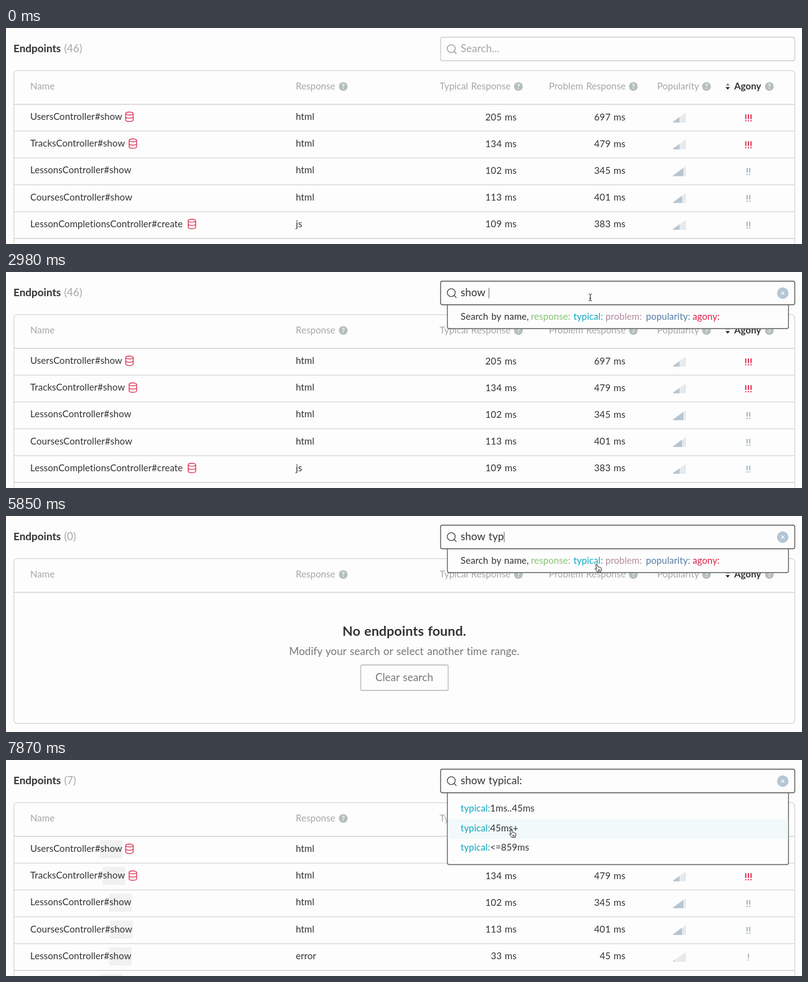
Recreate the animation shown at these times as an HTML page. Size 1280x348 px, loop 8000 ms.

```html
<!DOCTYPE html>
<html lang="en">
<head>
<meta charset="utf-8">
<title>Endpoint search</title>
<style>
  html, body { margin: 0; width: 100%; height: 100%; overflow: hidden; background: #fdfdfd; }
  svg { display: block; width: 1280px; height: 348px; font: 15px Lato, "Open Sans", sans-serif; letter-spacing: .06px; word-spacing: 1px; --edge: #d0d0d0; --lens: #9a9a9a; }
  svg.opening { --edge: #a3a3a3; --lens: #7c7c7c; }
  svg.open { --edge: #5c5c5c; --lens: #4a4a4a; }
  text { fill: #333; white-space: pre; }
  .big { font-size: 17px; }
  .bold { font-weight: 700; }
  .soft { fill: #a6a6a6; }
  .mid { fill: #777; }
  .end { text-anchor: end; }
  .center { text-anchor: middle; }
  .line { fill: none; stroke: #d5d5d5; stroke-width: 1.3; }
  .db { fill: none; stroke: #dc1f45; stroke-width: 1.2; }
  .help circle { fill: #b4bfbe; }
  .help text { fill: #fff; font: 700 11px Lato, sans-serif; text-anchor: middle; }
  .mark { fill: #f1f1f1; }
  .hover { fill: #f1f9fa; }
  .panel { fill: #fdfdfd; stroke: #666; stroke-width: 1.4; }
  .response { fill: #87c173; }
  .typical { fill: #0ea7bf; }
  .problem { fill: #b58a9f; }
  .popularity { fill: #557da5; }
  .agony { fill: #dc1f45; }
  #box { fill: #fdfdfd; stroke: var(--edge); stroke-width: 1.4; }
  #lens { fill: none; stroke: var(--lens); stroke-width: 1.3; stroke-linecap: round; }
  #caret { fill: #777; }
</style>
</head>
<body>
<svg id="stage" viewBox="0 0 1280 348">
  <text class="big bold" x="12" y="39">Endpoints</text>
  <text class="big soft" id="count" x="93.5" y="39"></text>
  <rect id="rowHover" class="hover" x="13" width="1255" height="43.2"/>
  <rect id="frame" class="line" x="12.7" y="68.7" width="1255.6" rx="5"/>
  <path class="line" d="M13 123H1268"/>
  <g id="head"></g>
  <g id="all"></g>
  <g id="found"></g>
  <g id="none">
    <text class="bold center" x="640.5" y="193" font-size="21.5">No endpoints found.</text>
    <text class="big mid center" x="640.5" y="224">Modify your search or select another time range.</text>
    <rect x="570.5" y="240" width="140.5" height="41" rx="2" fill="none" stroke="#b9b9b9" stroke-width="1.3"/>
    <text class="big mid center" x="640.5" y="266">Clear search</text>
  </g>
  <g id="hint"></g>
  <g id="names"></g>
  <g id="ranges"></g>
  <rect id="box" x="698.8" y="14.7" width="569.6" height="38" rx="3"/>
  <g id="lens"><circle cx="716" cy="33.2" r="6.4"/><path d="M720.6 37.8L724 41.2"/></g>
  <text class="big soft" id="prompt" x="731" y="39">Search...</text>
  <text class="big" id="query" x="731" y="39"></text>
  <rect id="caret" y="25.5" width="1.1" height="17"/>
  <g id="clear">
    <circle cx="1249" cy="34" r="9.2" fill="#b4c5d5"/>
    <path d="M1246.4 31.4l5.2 5.2m0-5.2l-5.2 5.2" stroke="#fff" stroke-width="1.2"/>
  </g>
  <g id="pointer" stroke="#222" stroke-linejoin="round" stroke-linecap="round">
    <path id="beam" d="M-2-5.5Q0-5.5 0-4.2Q0-5.5 2-5.5M0-4.2V4.2M-2 5.5Q0 5.5 0 4.2Q0 5.5 2 5.5M-1 1.5H1" fill="none"/>
    <path id="hand" d="M-3.4-5.4Q-2.2-6.8-1.2-5.2L.2-1.6Q1.4-2.6 2.2-1.3Q3.4-2 4.1-.7Q5.3-.9 5.4.6V3L4.6 4.6V6.2H-1.2L-1.7 4.8L-4.6 1.6Q-5.2.2-3.6.2L-1.9 1.2L-3.6-4Q-3.8-4.9-3.4-5.4ZM.6 2.2V4.4M2.6 2.2V4.4" fill="#fff"/>
  </g>
</svg>
<script>
const LOOP = 8000, ROW = 43.2, ITEM = 31.6, HOP = 118;
const $ = id => document.getElementById(id);
const label = (x, y, str, cls = '') => `<text x="${x}" y="${y}" class="${cls}">${str}</text>`;

// Table header
const help = x => `<g class="help"><circle cx="${x}" cy="94.3" r="7"/>${label(x, 98.2, '?')}</g>`;
$('head').innerHTML =
  label(39, 99, 'Name', 'soft') +
  label(466, 99, 'Response', 'soft') +
  label(811.5, 99, 'Typical Response', 'soft end') +
  label(996.5, 99, 'Problem Response', 'soft end') +
  label(1047, 99, 'Popularity', 'soft') +
  label(1171, 99, 'Agony', 'bold') +
  [542.3, 824, 1008.8, 1126.4, 1227.5].map(help).join('') +
  '<path d="M1157 92.8l3.5-4 3.5 4z" fill="#999"/><path d="M1157 95.3h7l-3.5 4z" fill="#222"/>';

// Table rows: name, format, typical, problem, popularity, agony, icon x
const top4 = [
  ['UsersController', 'html', 205, 697, 5, 3, 198.5],
  ['TracksController', 'html', 134, 479, 5, 3, 204],
  ['LessonsController', 'html', 102, 345, 8, 2],
  ['CoursesController', 'html', 113, 401, 7, 2]
];
const bars = level => Array.from({ length: 10 }, (_, i) => {
  const h = 2 + i * 1.5;
  return `<rect x="${1073 + i * 2.08}" y="${152.3 - h}" width="1.3" height="${h}" fill="${i < level ? '#8fa4b6' : '#dadfe2'}"/>`;
}).join('');
const bangs = n => {
  let d = '';
  for (let i = 0; i < n; i++) d += `M${1193.8 + (i - (n - 1) / 2) * 4.2} 139.3v7.4m0 1.8v2`;
  return `<path d="${d}" stroke="${n > 2 ? '#dc1f45' : n > 1 ? '#9db0c1' : '#a9b4be'}" stroke-width="1.8"/>`;
};
const disk = x => `<path class="db" transform="translate(${x} 143)" d="M-6-5.2A6 2.4 0 0 1 6-5.2A6 2.4 0 0 1-6-5.2V5.2A6 2.4 0 0 0 6 5.2V-5.2M-6 0A6 2.4 0 0 0 6 0"/>`;
const row = ([name, type, typical, problem, pop, agony, icon], i, action) =>
  `<g transform="translate(0 ${i * ROW})"><path class="line" d="M13 ${123 + ROW}H1268"/>` +
  label(39, 148, `${name}#${action}`, 'name') + label(466, 148, type) +
  label(821, 148.7, typical + ' ms', 'end') + label(996, 148.7, problem + ' ms', 'end') +
  bars(pop) + bangs(agony) + (icon ? disk(icon) : '') + '</g>';

$('all').innerHTML = top4.map((r, i) => row(r, i, 'show')).join('') +
  row(['LessonCompletionsController', 'js', 109, 383, 5, 2, 299], 4, 'create');
$('found').innerHTML = [...top4,
  ['LessonsController', 'error', 33, 45, 1, 1],
  ['UsersController', 'error', 31, 44, 1, 1]
].map((r, i) => row(r, i, 'show')).join('');

for (const t of $('found').querySelectorAll('.name')) {
  const from = t.textContent.indexOf('#') + 1;
  const x = t.getStartPositionOfChar(from).x, w = t.getSubStringLength(from, 4);
  t.insertAdjacentHTML('beforebegin', `<rect class="mark" x="${x - 0.5}" y="129" width="${w + 1}" height="29"/>`);
}

// Dropdowns
const panel = bottom => `<path class="panel" d="M709.7 50V${bottom - 3}q0 3 3 3H1255.3q3 0 3-3V50"/>`;
const word = (key, x) => label(x, 76.5, key + ':', key);
const list = items => items.map((s, i) => label(731, 83 + i * ITEM, s)).join('');
$('hint').innerHTML = panel(91.3) + label(731, 76.5, 'Search by name,') +
  word('response', 844) + word('typical', 912.5) + word('problem', 964) +
  word('popularity', 1029) + word('agony', 1104);
$('names').innerHTML = panel(232) +
  list(['', 'Users', 'Tracks', 'Courses', 'Lessons'].map(s => (s && s + 'Controller') + '#show'));
$('ranges').innerHTML = panel(168.5) +
  `<rect id="itemHover" class="hover" x="710.6" width="546.8" height="${ITEM}"/>` +
  list(['1ms..45ms', '45ms+', '&lt;=859ms'].map(s => `<tspan class="typical">typical:</tspan>${s}`));

// Each cue changes part of the state from its time on
const cues = [
  [0, { look: '', query: '', drop: '', view: 'all', caret: false }],
  [1330, { look: 'opening', drop: 'hint', caret: true }],
  [1440, { look: 'open' }],
  [1790, { caret: false }],
  [2270, { caret: true }],
  [2630, { query: 's' }],
  [2750, { query: 'sh' }],
  [2870, { query: 'show' }],
  [2980, { query: 'show ' }],
  [3340, { view: 'found', drop: 'names' }],
  [3460, { caret: false }],
  [3940, { caret: true }],
  [4300, { query: 'show t' }],
  [4650, { query: 'show ty', view: 'none', drop: 'hint' }],
  [4770, { query: 'show typ' }],
  [5250, { caret: false }],
  [5730, { caret: true }],
  [6330, { caret: false }],
  [6440, { query: 'show typical:', caret: true }],
  [6680, { view: 'found', drop: 'ranges' }],
  [6920, { caret: false }],
  [7400, { caret: true }],
  [7870, { caret: false }]
];
// Pointer paths: start time, then one position per hop
const paths = [
  [500, [[880, 300], [895, 262], [908, 215], [919, 160], [928, 108], [935, 66], [939.5, 41]]],
  [5250, [[941, 42], [952, 50], [972, 64], [991, 76], [976, 83], [952, 84], [938, 82], [934, 79.5]]],
  [7160, [[920, 82], [874, 92], [816, 108], [768, 120], [750, 124], [779, 122], [814.5, 118.5]]]
];
const counts = { all: '(46)', found: '(7)', none: '(0)' };

const show = (id, on) => $(id).style.display = on ? '' : 'none';

function pointerAt(t) {
  const path = paths.filter(p => p[0] <= t).pop();
  if (!path) return null;
  const [start, pts] = path;
  return pts[Math.min(pts.length - 1, Math.floor((t - start) / HOP))];
}

function draw(t) {
  const s = Object.assign({}, ...cues.filter(c => c[0] <= t).map(c => c[1]));
  $('stage').setAttribute('class', s.look);
  $('count').textContent = counts[s.view];
  $('frame').setAttribute('height', s.view === 'none' ? 265.5 : 400);
  for (const v of ['all', 'found', 'none']) show(v, v === s.view);
  for (const d of ['hint', 'names', 'ranges']) show(d, d === s.drop);

  $('query').textContent = s.query;
  show('prompt', !s.query);
  show('clear', s.query);
  show('caret', s.caret);
  $('caret').setAttribute('x', 731 + (s.query ? $('query').getComputedTextLength() : 0));

  const p = pointerAt(t);
  show('pointer', p);
  const tip = p ? p[1] - 6 : 0;
  const r = Math.floor((tip - 123) / ROW);
  show('rowHover', r >= 0);
  $('rowHover').setAttribute('y', 123 + r * ROW);
  if (!p) return;
  $('pointer').setAttribute('transform', `translate(${p})`);
  show('beam', p[1] < 53);
  show('hand', p[1] >= 53);
  $('itemHover').setAttribute('y', 64 + Math.max(0, Math.floor((tip - 64) / ITEM)) * ITEM);
}

const begin = performance.now();
function tick() {
  draw((performance.now() - begin) % LOOP);
  requestAnimationFrame(tick);
}
tick();
</script>
</body>
</html>
```
